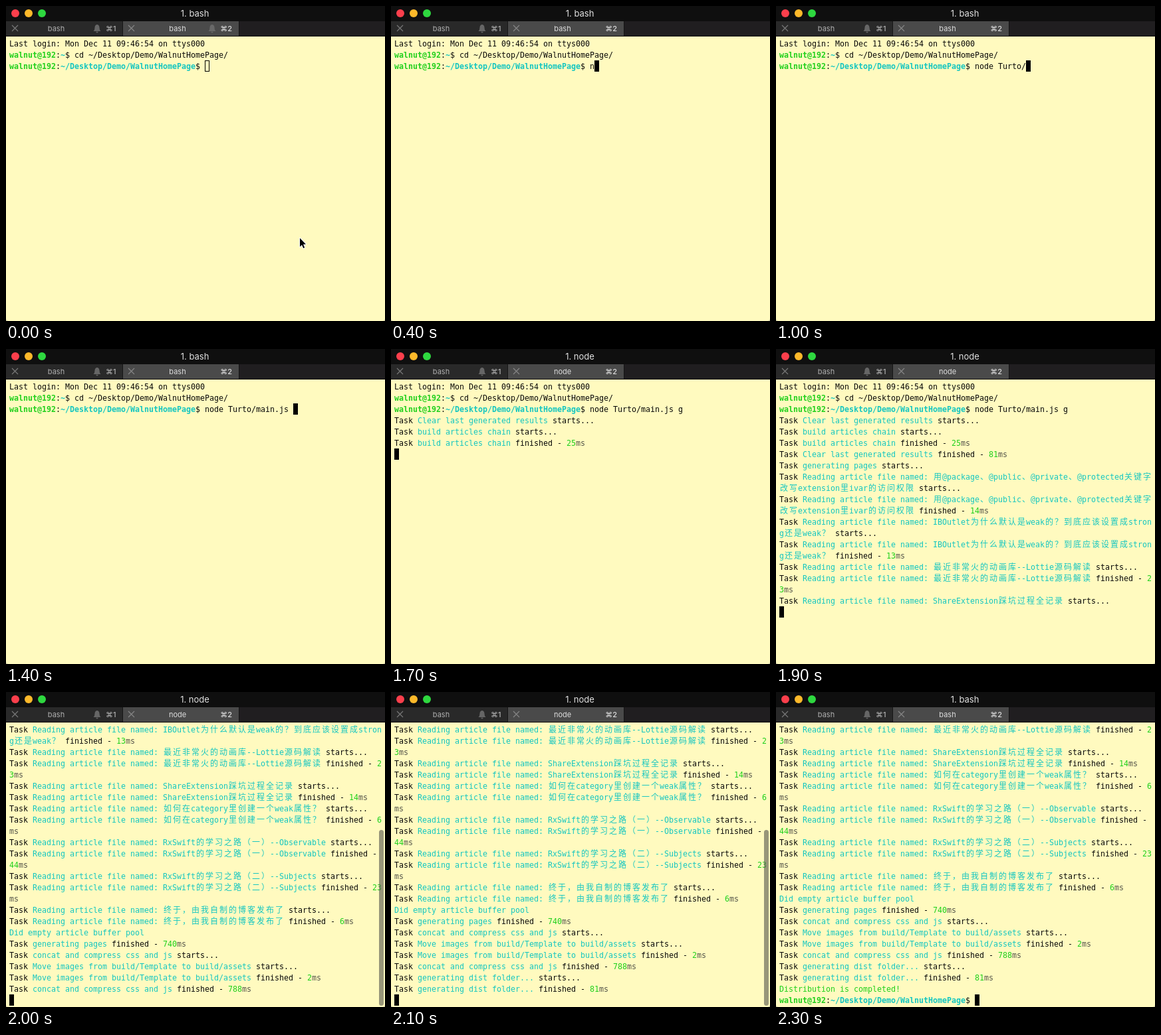
Animation of 570x475 px, one loop 2.4 s. Source, as an HTML page with a canvas:

```html
<!DOCTYPE html>
<html lang="zh-CN">
<head>
<meta charset="utf-8">
<title>Terminal</title>
<style>
html, body { margin: 0; width: 100%; height: 100%; overflow: hidden; background: #c9c6a4; }
canvas { display: block; width: 570px; height: 475px; }
</style>
</head>
<body>
<canvas id="stage" width="570" height="475"></canvas>
<script>
const ctx = document.getElementById('stage').getContext('2d');
const LOOP = 2400, COLS = 80, ROWS = 25, CELL = 7, LINE = 17, LEFT = 5, TOP = 48;
const MONO = '"DejaVu Sans Mono", monospace';
const CJK = '"Noto Sans CJK SC", "Noto Sans CJK", sans-serif';
const UI = 'Inter, sans-serif';
const INK = '#0a0a08', CYAN = '#14c6c0', GREEN = '#20d01c', GREY = '#55554a', PAPER = '#fffabf';

// A line is a list of [text, colour, bold] runs.
const starts = name => [['Task ', INK], [name, CYAN], [' starts...', INK]];
const done = (name, ms) =>
  [['Task ', INK], [name, CYAN], [' finished - ', INK], [String(ms), GREEN], ['ms', GREY]];
const article = (title, ms) => {
  const name = 'Reading article file named: ' + title;
  return [starts(name), done(name, ms)];
};
const prompt = (dir, cmd) =>
  [['walnut@192', GREEN, true], [':', INK], [dir, CYAN, true], ['$ ' + cmd, INK]];

const HOME = '~/Desktop/Demo/WalnutHomePage';
const CLEAR = 'Clear last generated results', CHAIN = 'build articles chain';
const PAGES = 'generating pages', CONCAT = 'concat and compress css and js';
const MOVE = 'Move images from build/Template to build/assets';
const DIST = 'generating dist folder...';

const log = [
  starts(CLEAR), starts(CHAIN), done(CHAIN, 25), done(CLEAR, 81), starts(PAGES),
  ...article('用@package、@public、@private、@protected关键字改写extension里ivar的访问权限', 14),
  ...article('IBOutlet为什么默认是weak的？到底应该设置成strong还是weak？', 13),
  ...article('最近非常火的动画库--Lottie源码解读', 23),
  ...article('ShareExtension踩坑过程全记录', 14),
  ...article('如何在category里创建一个weak属性？', 6),
  ...article('RxSwift的学习之路（一）--Observable', 44),
  ...article('RxSwift的学习之路（二）--Subjects', 23),
  ...article('终于，由我自制的博客发布了', 6),
  [['Did empty article buffer pool', CYAN]],
  done(PAGES, 740), starts(CONCAT), starts(MOVE), done(MOVE, 2), done(CONCAT, 788),
  starts(DIST), done(DIST, 81),
  [['Distribution is completed!', GREEN]],
  prompt(HOME, '')
];

const typing = [
  [0, ''], [400, 'n'], [500, 'no'], [600, 'nod'], [700, 'node '], [800, 'node T'],
  [900, 'node Tu'], [1000, 'node Turto/'], [1200, 'node Turto/m'],
  [1300, 'node Turto/ma'], [1400, 'node Turto/main.js '], [1700, 'node Turto/main.js g']
];
const output = [[0, 0], [1700, 3], [1800, 6], [1900, 12], [2000, 27], [2100, 29], [2200, 30], [2300, 32]];

const at = (steps, t) => steps.filter(s => s[0] <= t).pop()[1];

function layout(lines) {
  const glyphs = [];
  let row = 0, col = 0;
  lines.forEach((line, i) => {
    if (i) { row++; col = 0; }
    for (const [text, color, bold] of line) {
      for (const ch of text) {
        const wide = ch.codePointAt(0) > 0x2e80;
        const w = wide ? 2 : 1;
        if (col + w > COLS) { row++; col = 0; }
        if (ch !== ' ') glyphs.push({ ch, row, col, color, bold, wide });
        col += w;
      }
    }
  });
  return { glyphs, row, col };
}

function rect(x, y, w, h, color) {
  ctx.fillStyle = color;
  ctx.fillRect(x, y, w, h);
}

function label(text, x, y, size, color, align = 'center', weight = 400) {
  ctx.font = `${weight} ${size}px ${UI}`;
  ctx.textAlign = align;
  ctx.fillStyle = color;
  ctx.fillText(text, x, y);
}

function cross(x, y, color) {
  ctx.strokeStyle = color;
  ctx.lineWidth = 1.2;
  ctx.beginPath();
  ctx.moveTo(x - 4.5, y - 4.5); ctx.lineTo(x + 4.5, y + 4.5);
  ctx.moveTo(x + 4.5, y - 4.5); ctx.lineTo(x - 4.5, y + 4.5);
  ctx.stroke();
}

function bell(x, y, color) {
  ctx.fillStyle = color;
  ctx.beginPath();
  ctx.moveTo(x - 5.5, y + 4);
  ctx.quadraticCurveTo(x - 3.5, y + 2.5, x - 3.5, y - 1.5);
  ctx.bezierCurveTo(x - 3.5, y - 7.5, x + 3.5, y - 7.5, x + 3.5, y - 1.5);
  ctx.quadraticCurveTo(x + 3.5, y + 2.5, x + 5.5, y + 4);
  ctx.fill();
  ctx.beginPath();
  ctx.arc(x, y + 4.7, 1.7, 0, Math.PI);
  ctx.fill();
}

function drawBars(name, focused) {
  rect(0, 0, 570, 23, '#0f0f0f');
  ['#fb3f4c', '#fdb92a', '#2ed83f'].forEach((color, i) => {
    ctx.fillStyle = color;
    ctx.beginPath();
    ctx.arc(14 + 20 * i, 11, 6, 0, 7);
    ctx.fill();
  });
  label('1. ' + name, 284, 16, 13, '#e2e2e2');

  rect(0, 23, 570, 23, '#201e20');
  rect(0, 23, 175, 22, '#292929');
  rect(176, 23, 174, 22, '#4a4a4a');
  rect(175, 23, 1, 22, '#161616');
  rect(350, 23, 1, 22, '#161616');
  rect(0, 45, 570, 1, '#0c0a0c');
  cross(13.5, 33.5, '#777');
  cross(188.5, 33.5, '#858585');
  label('bash', 75.5, 38, 11, '#b0b0b0');
  label(name, 258, 38, 11, '#dedede');
  label('⌘1', 165.5, 38, 11, '#b0b0b0', 'right', 500);
  label('⌘2', 340, 38, 11, '#dedede', 'right', 500);
  bell(137, 34, '#666');
  if (!focused) bell(310, 34, '#686868');
}

function drawPointer(x, y) {
  const pts = [[0, 0], [0, 13], [3, 10.2], [5.2, 15.2], [7.2, 14.3], [5, 9.5], [9, 9.3]];
  ctx.beginPath();
  pts.forEach(([dx, dy]) => ctx.lineTo(x + dx, y + dy));
  ctx.closePath();
  ctx.lineJoin = 'round';
  ctx.lineWidth = 2;
  ctx.strokeStyle = '#fff';
  ctx.stroke();
  ctx.fillStyle = '#000';
  ctx.fill();
}

function drawTerminal(t, focused) {
  const { glyphs, row, col } = layout([
    [['Last login: Mon Dec 11 09:46:54 on ttys000', INK]],
    prompt('~', 'cd ' + HOME.slice(0) + '/'),
    prompt(HOME, at(typing, t)),
    ...log.slice(0, at(output, t)),
    ...(t >= 1700 && t < 2300 ? [[]] : [])
  ]);
  const scroll = Math.max(0, row - ROWS + 1);
  ctx.textAlign = 'left';
  for (const g of glyphs) {
    if (g.row < scroll) continue;
    ctx.font = g.wide ? `12px ${CJK}` : `${g.bold ? 'bold ' : ''}11.63px ${MONO}`;
    ctx.fillStyle = g.color;
    ctx.fillText(g.ch, LEFT + g.col * CELL + (g.wide ? 1 : 0), TOP + 13 + (g.row - scroll) * LINE);
  }
  const x = LEFT + col * CELL, y = TOP + (row - scroll) * LINE;
  if (focused) {
    rect(x, y, CELL, LINE, '#000');
  } else {
    ctx.strokeStyle = '#000';
    ctx.lineWidth = 1;
    ctx.strokeRect(x + 0.5, y + 0.5, CELL - 1, LINE - 1);
  }
}

function draw(t) {
  const focused = t >= 200;
  ctx.clearRect(0, 0, 570, 475);
  ctx.save();
  ctx.beginPath();
  ctx.roundRect(0, 0, 570, 475, [0, 0, 4, 4]);
  ctx.clip();
  rect(0, 0, 570, 475, PAPER);
  drawTerminal(t, focused);
  if (t >= 2000 && t < 2300) {
    ctx.fillStyle = 'rgba(90, 90, 80, 0.62)';
    ctx.beginPath();
    ctx.roundRect(561, 208, 7, 265, 3.5);
    ctx.fill();
  }
  drawBars(t >= 1700 && t < 2300 ? 'node' : 'bash', focused);
  if (t < 400) drawPointer(442, 350);
  ctx.restore();
}

const begin = performance.now();
function tick() {
  draw((performance.now() - begin) % LOOP);
  requestAnimationFrame(tick);
}
tick();
</script>
</body>
</html>
```
